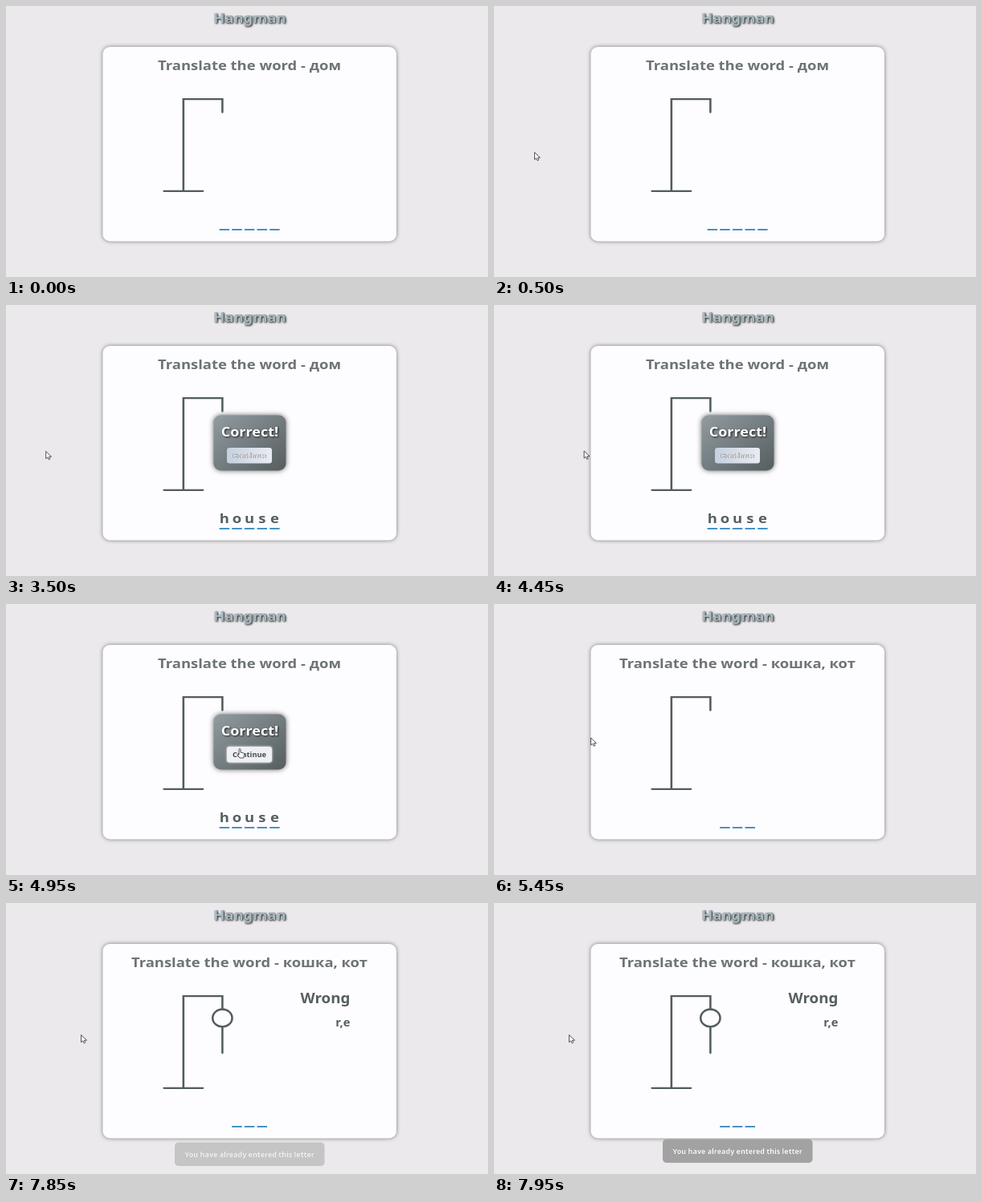
Animation of 600 by 338 pixels, one loop 8000 ms. Source, as an HTML page:

```html
<!DOCTYPE html>
<html lang="en">
<head>
<meta charset="utf-8">
<title>Hangman</title>
<style>
  html, body { margin: 0; width: 100%; height: 100%; overflow: hidden; background: #ebe9eb; }
  svg { display: block; width: 600px; height: 338px; }
  text { font: bold 16.6px "Noto Sans", "Open Sans", sans-serif; text-anchor: middle; fill: #565f60; }
  .gallows { fill: none; stroke: #525d5b; stroke-width: 4.2; stroke-linecap: round; }
  #heading { fill: #a9bcc2; filter: drop-shadow(0 0 .6px #2c3438) drop-shadow(1px 1px .8px #222); }
  #card { fill: #fdfcfe; filter: drop-shadow(0 0 2.5px #777); }
  #task { fill: #6d7377; }
  #wrong text { text-anchor: end; }
  #popup > rect:first-child { fill: url(#steel); filter: drop-shadow(0 0 3px #666); }
  #popup .won { font-weight: 600; font-size: 16.2px; fill: #fff; filter: drop-shadow(1px 1px 1px #222); }
  #button { fill: url(#pale); }
  #label { font-size: 8.3px; fill: #f2f3f5; filter: drop-shadow(.6px .6px .4px #333) drop-shadow(0 0 .5px #555); }
  .hover #button { fill: #eef0f4; filter: drop-shadow(0 0 1.5px #fff); }
  .hover #label { fill: #43494c; filter: none; }
  #toast rect { fill: #a3a2a3; }
  #toast text { font-size: 8.1px; fill: #fff; filter: drop-shadow(.7px .7px .6px #555); }
  #cursor path { fill: #fff; stroke: #333; stroke-width: .8; stroke-linejoin: round; }
</style>
</head>
<body>
<!-- The whole scene is a 540 x 338 page shown on a wider stage -->
<svg viewBox="0 0 540 338" preserveAspectRatio="none">
  <defs>
    <linearGradient id="steel" x2="1" y2="1">
      <stop stop-color="#929ca1"/><stop offset="1" stop-color="#555d5f"/>
    </linearGradient>
    <linearGradient id="pale" x2="1" y2="0">
      <stop stop-color="#c6d0df"/><stop offset="1" stop-color="#e9ecf2"/>
    </linearGradient>
  </defs>
  <text id="heading" x="273.1" y="21.2">Hangman</text>
  <rect id="card" x="108.4" y="51" width="329" height="242.5" rx="8.5"/>
  <text id="task" x="272.7" y="79.6"></text>
  <g class="gallows" transform="translate(166 105.2) scale(.546)">
    <path d="M20 230H100M60 230V20H140V50"/>
    <circle id="head" cx="140" cy="70" r="20"/>
    <path id="body" d="M140 90V150"/>
  </g>
  <g id="wrong">
    <text x="385.6" y="125.5" style="font-size:16.9px">Wrong</text>
    <text id="misses" x="385.6" y="154" style="font-size:13.3px"></text>
  </g>
  <g id="slots"></g>
  <g id="popup">
    <rect x="232.6" y="137.5" width="81" height="69" rx="8.5"/>
    <text class="won" x="273.1" y="164">Correct!</text>
    <rect id="button" x="247.5" y="178" width="50.4" height="19.5" rx="3"/>
    <text id="label" x="272.7" y="190.8">Continue</text>
  </g>
  <g id="toast">
    <rect x="189" y="294.5" width="167.9" height="29.5" rx="4.5"/>
    <text x="272.9" y="312.6">You have already entered this letter</text>
  </g>
  <g id="cursor">
    <path id="arrow" d="M.5 .5V9.6L2.4 7.8 3.7 10.8 5.2 10 3.9 7.2H6.7Z"/>
    <path id="hand" d="M0 6V1.6a.9 1 0 0 1 1.8 0V5l3.2 .8q1.1 .3 .9 1.6L5.2 12H.9L-2 7.9q.7-1.5 2 .2Z"/>
  </g>
</svg>
<script>
const LOOP = 8000, STEP = 50;
const $ = id => document.getElementById(id);
const show = (id, on) => $(id).style.display = on ? "" : "none";

const linear = u => u;
const smooth = u => u * u * (3 - 2 * u);
const easeOut = u => 1 - (1 - u) ** 2.3;

// Pointer path: time, x, y, easing towards that point
const path = [
  [50, 290, 269, linear], [250, 126, 14, linear], [400, 12, 120, linear], [500, 45, 182, smooth],
  [1000, 45, 182, linear], [1050, 44.2, 182, linear],
  [4200, 44.2, 182, linear], [4950, 261, 180, smooth],
  [5200, 261, 180, linear], [5650, 80, 164, easeOut],
  [5950, 80, 164, linear], [6150, 83.7, 164, smooth], [LOOP, 83.7, 164, linear]
];

function pointer(t) {
  const i = Math.max(1, path.findIndex(p => p[0] > t));
  const [t0, x0, y0] = path[i - 1], [t1, x1, y1, ease] = path[i];
  const k = ease(Math.max(0, (t - t0) / (t1 - t0)));
  return [x0 + (x1 - x0) * k, y0 + (y1 - y0) * k];
}

const typedAt = [1700, 2000, 2950, 3150, 3500];

function slots(word, shown) {
  return [...word].map((letter, i) => {
    const x = 272.8 + (i - (word.length - 1) / 2) * 14.08;
    return `<path d="M${x - 5.6} 278.9h11.2" stroke="#2980b9" stroke-width="1.7"/>` +
      (shown(i) ? `<text x="${x}" y="271.6">${letter}</text>` : "");
  }).join("");
}

function draw(t) {
  const first = t < 5050;
  $("task").textContent = "Translate the word - " + (first ? "дом" : "кошка, кот");
  $("slots").innerHTML = first ? slots("house", i => t >= typedAt[i]) : slots("cat", () => false);

  show("head", t >= 6450);
  show("wrong", t >= 6450);
  show("body", t >= 7150);
  $("misses").textContent = t < 7150 ? "r" : "r,e";

  const [x, y] = pointer(t);
  const popup = first && t >= 3500;
  const hover = popup && x > 247.5;
  show("popup", popup);
  $("popup").classList.toggle("hover", hover);

  show("cursor", t >= 50);
  show("arrow", !hover);
  show("hand", hover);
  $("cursor").setAttribute("transform", `translate(${x} ${y})`);

  const rise = Math.min(1, (t - 7750) / 200);
  show("toast", rise > 0);
  $("toast").setAttribute("transform", `translate(0 ${16 * (1 - rise) ** 2})`);
  $("toast").setAttribute("opacity", Math.max(0, rise));
}

function frame() {
  draw(Math.floor(performance.now() % LOOP / STEP) * STEP);
  requestAnimationFrame(frame);
}
frame();
</script>
</body>
</html>
```
